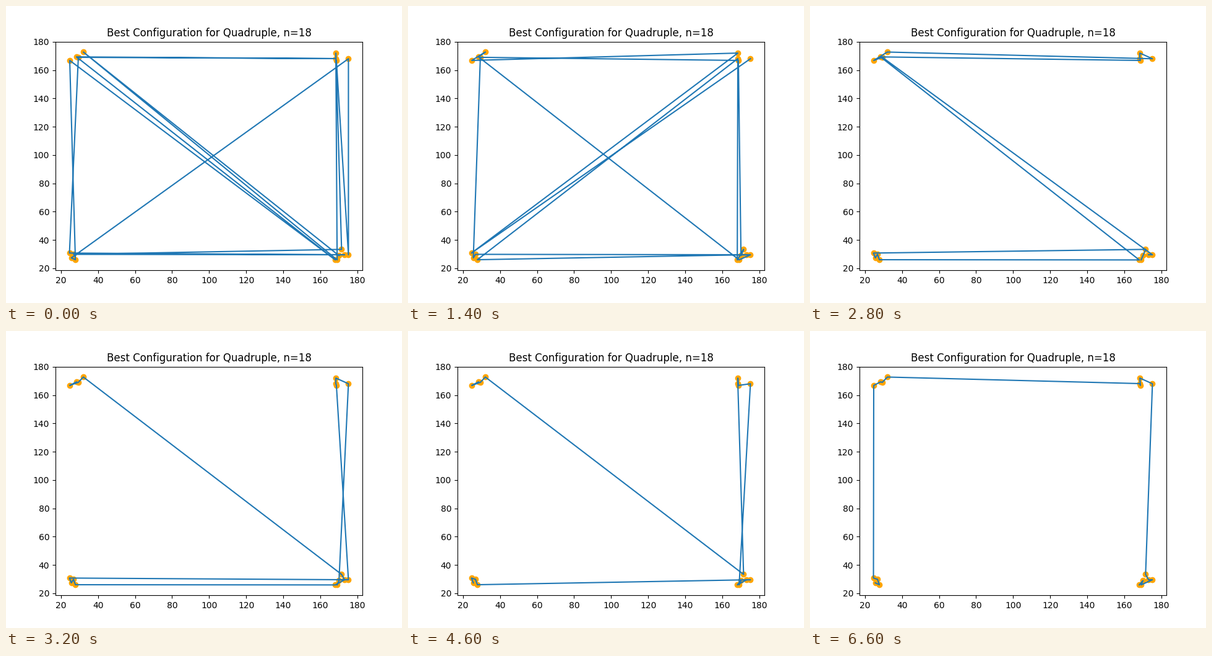
A matplotlib script that plays this animation: 640 by 480 pixels, repeating every 6.8 s.

```python
import matplotlib.pyplot as plt
from matplotlib.animation import FuncAnimation

INTERVAL = 200

# Four clusters of cities, each named by a letter.
CITIES = {
    "A": (24.75, 166.8), "B": (28.4, 169.3), "C": (29.4, 169.0), "D": (32.1, 172.73),
    "E": (168.4, 172.0), "F": (168.4, 168.1), "G": (168.7, 166.8), "H": (175.2, 168.0),
    "I": (24.6, 30.7), "J": (25.6, 27.3), "K": (26.8, 29.8), "L": (27.8, 26.0),
    "M": (171.5, 33.3), "N": (170.1, 28.9), "O": (173.1, 29.5), "P": (175.2, 29.5),
    "Q": (168.1, 25.85), "R": (169.1, 25.9),
}

# Milestones of the search: step number and visiting order.
MILESTONES = [
    (0, "GPHJLAQBFCIOKMERDN"),
    (4, "NMHGCJEQFBLRDAKIPO"),
    (10, "HIEADBRPKLJOMNCGFQ"),
    (14, "RNMIJKLQBGFEHDACPO"),
    (19, "BACDMORNQHGEFKILJP"),
    (27, "JIKLPOQRNMHEGFCDAB"),
    (33, "JLKIABCDFGEHMOPRNQ"),
]


def reversals(start, goal):
    """Tours met while turning start into goal by reversing segments."""
    tours = [start]
    tour = start
    for i, city in enumerate(goal):
        j = tour.index(city)
        if j != i:
            tour = tour[:i] + tour[i:j + 1][::-1] + tour[j + 1:]
            tours.append(tour)
    return tours


def build_history():
    history = [MILESTONES[0][1]]
    for (s0, start), (s1, goal) in zip(MILESTONES, MILESTONES[1:]):
        # A path has no direction: approach the goal from its nearer end.
        chain = min(reversals(start, goal), reversals(start[::-1], goal), key=len)
        steps = s1 - s0
        last = len(chain) - 1
        history += [chain[round(last * k / steps)] for k in range(1, steps + 1)]
    return history


history = build_history()

fig, ax = plt.subplots(figsize=(6.4, 4.8), dpi=100)
ax.scatter(*zip(*CITIES.values()), color="orange")
path, = ax.plot([], [], color="tab:blue", linewidth=1.5)
ax.set_xlim(17.07, 182.74)
ax.set_ylim(18.5, 180.08)
ax.set_title("Best Configuration for Quadruple, n=18")


def update(step):
    path.set_data(*zip(*(CITIES[c] for c in history[step])))
    return path,


anim = FuncAnimation(fig, update, frames=len(history), interval=INTERVAL,
                     repeat=True, repeat_delay=0)
plt.show()
```
